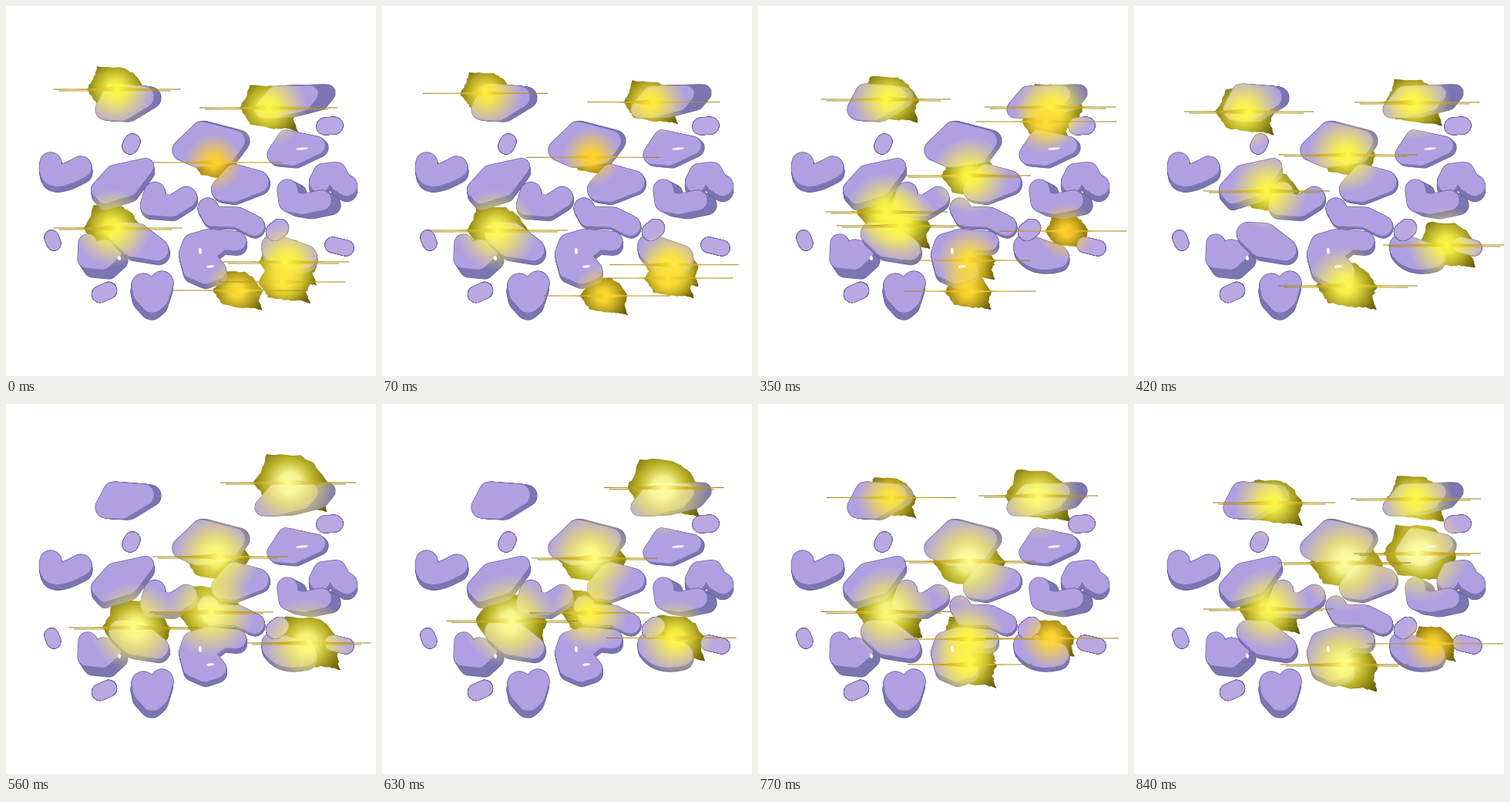
An HTML page with a canvas for the animation above (0.91 s loop, 480 by 480 pixels).

```html
<!DOCTYPE html>
<html lang="en">
<head>
<meta charset="utf-8">
<title>Sparks over lilac pebbles</title>
<style>
  html, body { margin: 0; width: 100%; height: 100%; overflow: hidden; background: #fff; }
  canvas { display: block; }
</style>
</head>
<body>
<canvas id="stage" width="480" height="480"></canvas>
<script>
const ctx = document.getElementById('stage').getContext('2d');
const STEP = 70, LOOP = 910, TAU = Math.PI * 2;

// Slabs: outline, thickness, offset of the shaded side.
const leftSlabs = [
  ['M58 204Q52 234 97 209', 28, 1, 7],
  ['M130 134L140 115L178 118L150 135Z', 28, 9, 1],
  ['M121 238L140 217L181 208L160 236L128 246Z', 21, 1, 8],
  ['M193 242L188 258L215 260L234 248', 27, 1, 5],
  ['M106 308L105 328L125 330L138 318L126 315', 24, 8, 12],
  ['M148 295L170 296L196 316L165 311Z', 29, 2, 5],
  ['M178 362L180 372L190 383L196 378L202 359', 30, -1, 9]
];
const middleSlabs = [
  ['M230 187L254 164L296 175L285 190L248 195Z', 28, 6, 0],
  ['M281 238L297 220L326 228L295 240Z', 29, 2, 3],
  ['M262 262L268 273L300 274L322 285', 26, 1, 3],
  ['M299 305L262 302L242 308L237 322L242 341L258 348L273 343L264 332', 25, 1, 6]
];
const rightSlabs = [
  ['M334 134L350 115L394 114L385 125L350 134Z', 22, 22, -1],
  ['M351 193L364 173L402 181L372 195Z', 24, 4, 3],
  ['M407 228L412 218L428 216L434 228L442 233', 27, 0, 7],
  ['M365 238L367 254L385 257L409 252', 26, 12, 6],
  ['M347 311L388 325Q360 332 347 315Z', 30, 1, 5]
];
const pebbles = [
  ['M164 176L161 182', 20], ['M414 156L426 155', 22], ['M349 293L355 288', 23],
  ['M424 310L441 314', 20], ['M122 374L133 369', 21], ['M59 300L62 308', 18]
];
const gaps = [[384, 185, 8, 1.4], [265, 338, 5, 1.6], [252, 318, 2, 4], [147, 327, 2, 3]];

// Sparks by step: x, y, power.
const sparks = {
  0: [[142, 108, 2], [340, 132, 2], [270, 203, 1], [138, 288, 2], [365, 332, 2], [360, 358, 1.6], [300, 369, 1.4]],
  3: [[122, 124, 1], [363, 110, 1.2], [275, 183, 1.2], [185, 266, 1.2], [170, 297, 2.6], [395, 343, 1.1], [262, 390, 1]],
  5: [[170, 121, 2], [383, 131, 2], [372, 150, 1.3], [275, 220, 2], [165, 267, 2], [185, 285, 2], [400, 292, 1], [275, 330, 1.4], [272, 370, 1.2]],
  6: [[143, 137, 2], [362, 125, 2], [275, 193, 2], [175, 240, 2], [405, 310, 2], [275, 363, 2.1]],
  8: [[368, 102, 3], [272, 198, 2.5], [265, 270, 2.6], [168, 290, 2.7], [390, 310, 2.6]],
  10: [[163, 115, 1], [360, 115, 3], [270, 202, 2.8], [165, 273, 3], [272, 272, 1.2], [372, 297, 1.3], [270, 338, 1.3]],
  12: [[180, 128, 2], [365, 123, 2], [275, 206, 3], [370, 194, 3], [175, 266, 2.2], [272, 338, 2.6], [388, 311, 1.1]]
};
const burst = [[-1, 0], [-.72, .4], [-.6, .58], [.2, .72], [.6, .72], [1.03, .82],
  [.9, .4], [1.04, .02], [.68, -.52], [.3, -.76], [-.65, -.8], [-.78, -.35]];

const mix = (a, b, k) => a + (b - a) * k;
const radius = power => 18 + 9.5 * power;
const noise = n => { const v = Math.sin(n * 127.1) * 43758.5; return v - Math.floor(v); };
const distance = (a, b) => Math.hypot(a[0] - b[0], a[1] - b[1]);

function sparksAt(step) {
  const steps = Object.keys(sparks).map(Number);
  const next = steps.find(s => s >= step);
  if (next === step) return sparks[step];
  const last = steps[steps.indexOf(next) - 1];
  const part = (step - last) / (next - last);
  return sparks[last].map(a => {
    const b = sparks[next].reduce((p, q) => distance(a, q) < distance(a, p) ? q : p);
    return distance(a, b) < 75 ? a.map((v, i) => mix(v, b[i], part)) : [a[0], a[1], a[2] * .7];
  });
}

// Gold, then lemon, then pale as the power rises.
function color(power, alpha) {
  const k = Math.min(1, Math.max(0, power - 1)), pale = Math.max(0, power - 2);
  return `rgba(255,${mix(208, 248, k) + pale * 7},${mix(45, 70, k) + pale * 85},${alpha})`;
}

function stroke(path, width, style) {
  ctx.lineWidth = width;
  ctx.strokeStyle = ctx.fillStyle = style;
  ctx.stroke(path);
  if (width > 1) ctx.fill(path);
}

function slab([d, width, dx = 0, dy = 0], face) {
  const path = new Path2D(d);
  const sides = 6;
  for (const [grow, style] of [[1.2, '#625b92'], [0, '#7b75b2']]) {
    for (let i = 0; i <= sides; i++) {
      ctx.save();
      ctx.translate(dx * i / sides, dy * i / sides);
      stroke(path, width + grow, style);
      ctx.restore();
    }
  }
  stroke(path, width - .4, face);
}

function drawPebbles() {
  ctx.lineCap = ctx.lineJoin = 'round';
  for (const s of [...leftSlabs, ...middleSlabs, ...rightSlabs]) slab(s, '#b1a0e1');
  for (const p of pebbles) slab(p, '#bba7e2');
  ctx.globalCompositeOperation = 'destination-out';
  for (const [x, y, rx, ry] of gaps) {
    ctx.beginPath();
    ctx.ellipse(x, y, rx, ry, -.1, 0, TAU);
    ctx.fill();
  }
  ctx.globalCompositeOperation = 'source-over';
}

function drawBurst([x, y, power]) {
  const r = radius(power), cuts = 5;
  ctx.beginPath();
  burst.forEach((a, i) => {
    const b = burst[(i + 1) % burst.length];
    for (let j = 0; j < cuts; j++) {
      const n = i * cuts + j + x + y;
      const k = r * (.97 + .07 * noise(n));
      ctx.lineTo(x + mix(a[0], b[0], j / cuts) * k, y + mix(a[1], b[1], j / cuts) * k);
    }
  });
  ctx.fillStyle = '#554a00';
  ctx.fill();
}

function drawGlow([x, y, power]) {
  const r = radius(power) * 1.35;
  const glow = ctx.createRadialGradient(x, y, 0, x, y, r);
  glow.addColorStop(0, color(power, 1));
  glow.addColorStop(.22, color(power, .92));
  glow.addColorStop(.5, color(Math.min(power, 2), .6));
  glow.addColorStop(.75, color(Math.min(power, 2), .28));
  glow.addColorStop(1, color(Math.min(power, 2), 0));
  ctx.fillStyle = glow;
  ctx.fillRect(x - r, y - r, 2 * r, 2 * r);
}

function drawStreak([x, y, power]) {
  const left = x - 76 - 14 * noise(x), right = x + 78 + 16 * noise(y), r = radius(power);
  const shine = ctx.createLinearGradient(left, 0, right, 0);
  shine.addColorStop(0, '#8f7914');
  shine.addColorStop(.3, '#c9a91c');
  shine.addColorStop(.5, color(power, 1));
  shine.addColorStop(.7, '#c9a91c');
  shine.addColorStop(1, '#8f7914');
  ctx.fillStyle = shine;
  ctx.fillRect(left, y - .5, right - left, 1);
  if (power >= 2) ctx.fillRect(left + 7, y + 1.5, right - left - 20, 1);
  ctx.beginPath();
  ctx.moveTo(x - r * 1.5, y);
  ctx.quadraticCurveTo(x - r * .5, y - 1, x, y - 4);
  ctx.quadraticCurveTo(x + r * .5, y - 1, x + r * 1.5, y);
  ctx.quadraticCurveTo(x + r * .5, y + 1, x, y + 4);
  ctx.quadraticCurveTo(x - r * .5, y + 1, x - r * 1.5, y);
  ctx.fill();
}

function draw(step) {
  const live = sparksAt(step);
  ctx.clearRect(0, 0, 480, 480);
  live.forEach(drawBurst);
  drawPebbles();
  ctx.globalCompositeOperation = 'source-atop';
  live.forEach(drawGlow);
  ctx.globalCompositeOperation = 'source-over';
  live.forEach(drawStreak);
}

let shown = -1;
function tick() {
  const step = Math.floor(performance.now() % LOOP / STEP);
  if (step !== shown) draw(shown = step);
  requestAnimationFrame(tick);
}
tick();
</script>
</body>
</html>
```
